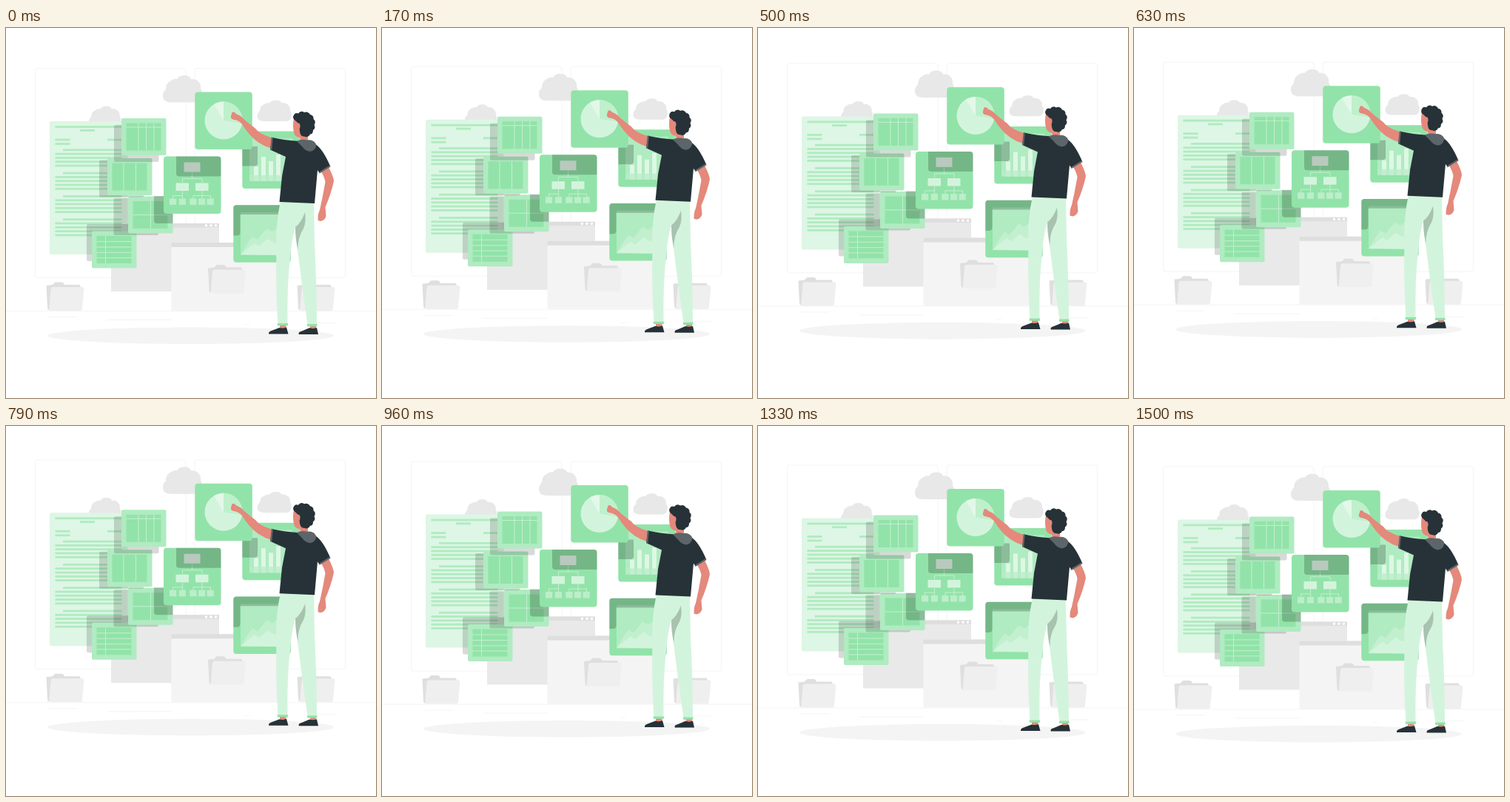
An HTML page that plays this animation: 500 by 500 pixels, repeating every 1540 ms.

```html
<!DOCTYPE html>
<html lang="en">
<head>
<meta charset="utf-8">
<title>Floating dashboard</title>
<style>
  html, body { margin: 0; height: 100%; overflow: hidden; background: #fff; }
  svg { display: block; width: 100%; height: 100%; }
  .green { fill: #92e3a9; }
  .soft { fill: #b0ebc1; }
  .pale { fill: #d3f4dc; }
  .dark { fill: #263238; }
  .grey { fill: #5c6569; }
  .skin { fill: #e4897b; }
  .shade { fill: #000; opacity: .2; }
  .line { fill: none; stroke: #c3f0cf; }
  .faint { fill: none; stroke: #f4f4f4; }
</style>
</head>
<body>
<svg viewBox="0 0 500 500">
  <defs>
    <path id="cloud" fill="#e8e8e8" d="M-17 36.500Q-27 36-27 28Q-27 22-23 19Q-23 10-16 7Q-12 4-8 5Q-5 0 2 0Q9 0 11 5Q19 4 23 11Q25 15 24 18Q27 22 26 28Q25 36.500 17 36.500Z"/>
    <g id="folder">
      <path fill="#dfdfdf" d="M54.500 348L63 347Q65 343.500 67 343.500H76Q78 344 79 347H99Q101 348 101 351L98 381H58Q56 381 56 378Z"/>
      <path fill="#efefef" d="M63 350H103Q105.500 350 105.300 353L103 379Q103 382 100 382H60Q58 382 58.300 379L60.500 353Q61 350 63 350Z"/>
    </g>
  </defs>
  <g id="scene">
    <g class="faint">
      <rect x="39.500" y="54.500" width="203.500" height="283" rx="3"/>
      <rect x="255" y="54.500" width="203.500" height="283" rx="3"/>
      <path d="M0 382.500H500M57 390.500H96M136 394.500H224M323 400.500H329M414 398.500H447"/>
    </g>
    <use href="#cloud" transform="translate(239 64)"/>
    <use href="#cloud" transform="translate(363 97.500) scale(.87 .78)"/>
    <use href="#cloud" transform="translate(134 105.500) scale(.82 .78)"/>
    <ellipse cx="249.500" cy="415.700" rx="193.500" ry="11.300" fill="#f4f4f4"/>

    <path fill="#e9e9e9" d="M142 264H288V356H142Z"/>
    <path fill="#dedede" d="M142 264H288V269.500H142Z"/>
    <path stroke="#fff" stroke-width="3.600" stroke-linecap="round" d="M270.500 266.800h0M277 266.800h0M283.500 266.800h0"/>
    <path fill="#f4f4f4" d="M223.500 290H369V382H223.500Z"/>
    <path fill="#dedede" d="M223.500 290H369V296H223.500Z"/>
    <use href="#folder"/>
    <use href="#folder" x="218.500" y="-23.500"/>
    <use href="#folder" x="339"/>

    <rect x="59" y="126" width="105.500" height="180" rx="2" fill="#def6e5"/>
    <g id="text" class="soft"></g>
    <g id="tables"></g>
    <path class="shade" d="M200 227H225.500V264H204Q200 264 200 260Z"/>

    <!-- bar chart -->
    <rect class="green" x="319.300" y="139.500" width="77.500" height="77.500" rx="4"/>
    <path class="soft" d="M329 149H387V207H329Z"/>
    <path fill="#def7e5" d="M335 187h6v20h-6zM345 174h6v33h-6zM355 180h6v27h-6zM365 171h6v36h-6z"/>
    <path fill="#b9edc8" opacity=".75" d="M329 199H387V207H329Z"/>
    <path class="shade" d="M319.300 160H340V182.500Q340 186.500 336 186.500H319.300Z"/>

    <!-- area chart -->
    <rect class="green" x="307.300" y="239.300" width="77.500" height="77.500" rx="4"/>
    <path class="soft" d="M317 249H375V307H317Z"/>
    <path fill="#c2f0cf" d="M317.500 306L325 293L333 282L340 286L352 271L360 275L375 264V307Z"/>
    <path fill="#d3f4dc" d="M317.500 306L328 297L336 291L342 295L354 285L361 290L375 292V307Z"/>
    <path class="shade" d="M311.300 239.300H381Q385 239.300 385 243.300V252H316.500V276Q316.500 280.500 312 280.500H307.300V243.300Q307.300 239.300 311.300 239.300Z"/>

    <!-- hierarchy -->
    <rect class="green" x="213" y="173.500" width="77.500" height="77.500" rx="4"/>
    <path class="line" d="M251.500 195V203.500M238.500 209V203.500H265V209M238.500 220V226.500M225.500 231V226.500H238.500V231M265 220V231M253 231V226.500H276.500V231"/>
    <path class="shade" d="M230 173.500H286.500Q290.500 173.500 290.500 177.500V200.500H234Q230 200.500 230 196.500Z"/>
    <path fill="#b9c9be" d="M240.500 181.500H262.500V194.500H240.500Z"/>
    <path class="pale" d="M229.500 209.500h17.500v10.500h-17.500zM256 209.500h17.500v10.500h-17.500z"/>
    <path fill="#bbeec9" d="M221 230.500h9.200v8.500h-9.200zM233.800 230.500h9.200v8.500h-9.200zM248.300 230.500h9.200v8.500h-9.200zM260 230.500h9.200v8.500h-9.200zM271.500 230.500h9.200v8.500h-9.200z"/>

    <!-- pie chart -->
    <rect class="green" x="255.300" y="86.500" width="77.500" height="77.500" rx="4"/>
    <circle class="pale" cx="294" cy="125" r="25.500"/>
    <path fill="#bff0cc" d="M294 125V99.500A25.500 25.500 0 0 1 319.200 129Z"/>
    <path fill="#e3f8e9" d="M294 125V99.500A25.500 25.500 0 0 0 281 103Z"/>

    <!-- man -->
    <path class="skin" d="M305.500 114Q308 112.500 311 116L317 119Q324 126 331 131Q337 135 341 140Q350 146 360 148.500L358 162.500Q349 160 341 154.500Q329 146 319 130Q315 125 309 124Q303 123.500 304 119Z"/>
    <path class="skin" d="M436 188Q443 202 443 207Q439 225 431.500 242L432.500 254Q431 260 425 261L421.500 260Q421.500 250 424 246Q428 228 431.500 208Q430 200 425 193Z"/>
    <path class="skin" d="M370 401H378.500V407H370ZM411 402H419V408H411Z"/>
    <path class="dark" d="M355 413.500Q354.500 410 359 409L369.500 405Q375 406.500 379 404.500L381.500 413.500ZM395.500 413.500Q395 410.500 400 409.500L410 405.300Q415 407 420 405L422 414H396Z"/>
    <path class="pale" d="M371 234Q364 264 365.500 300Q364 350 367.500 400H380.500Q379.500 350 384 310Q386 285 391 269Q391 285 394 300Q400 350 407.500 401H420Q420 350 417 290L416 236Z"/>
    <path fill="#a8c2b0" d="M404 249Q406 262 402 271Q394 283 394.500 300Q391 285 391 269Q399 263 404 249Z"/>
    <path class="green" d="M366.700 399H381V402.300H366.700ZM407 400H420.500V403.300H407Z"/>
    <path class="skin" d="M389 122Q387 132 389 141Q390 147 397 148L398 154H408V135L397 121Z"/>
    <path class="dark" d="M360 148Q377 152 397 153L418 157Q428 163 438.300 187L423.500 196L421 192L417 237L369.500 235L373 200L378 174L357 164.500Z"/>
    <path class="grey" d="M358.700 147.500L360.800 148L359.300 165L357 164.500ZM437.500 185.500L438.500 187.500L423.800 196.500L423 194.500Z"/>
    <path class="grey" d="M393 153Q399 149.500 407 151.500Q416 150 419.500 158Q418 166 411 167Q404 166 400 160Z"/>
    <path class="dark" d="M392 126Q386 122 389 117.500Q391 114 395 115.500Q398 111 403 114Q408 112 411 117Q416 118 415.500 123Q419.500 126 416.500 131Q419 135 415 138Q415 143.500 411 143.500Q408 149 403 146.500Q398 147 397 140L396 130Z"/>
    <ellipse class="skin" cx="395" cy="132.500" rx="2.500" ry="4"/>
  </g>
</svg>
<script>
const get = id => document.getElementById(id);
const rect = (x, y, w, h, attrs = '') => `<rect x="${x}" y="${y}" width="${w}" height="${h}" ${attrs}/>`;

function textLines() {
  const bar = (x, y, end = 156.5) => rect(x, y - 1.4, end - x, 2.8);
  let out = bar(66.5, 133.5) + bar(100, 138.3, 120) + bar(66.5, 151, 86.5) + bar(137, 151) + bar(66.5, 156.5, 86.5);
  for (let group = 0; group < 4; group++)
    for (let row = 0; row < 5; row++)
      out += bar(row ? 66.5 : 77, 164.8 + group * 31.3 + row * 5.3);
  return out;
}

// Columns and rows are offsets from the card corner.
function table(x, y, shadowX, shadowY, columns, rows) {
  const grid = columns.map(c => `M${x + c} ${y + 6.5}v37`).join('') + rows.map(r => `M${x + 6.5} ${y + r}h47`).join('');
  return rect(x + shadowX, y + shadowY, 60.5, 50, 'rx="2" fill="#000" opacity=".15"')
    + rect(x, y, 60.5, 50, 'rx="2" class="soft"')
    + rect(x + 6.5, y + 6.5, 47, 37, 'class="green"')
    + `<path class="line" d="${grid}"/>`;
}

get('text').innerHTML = textLines();
get('tables').innerHTML =
  table(116, 274.5, -7, -9.5, [18.5], [14, 21.5, 28.8, 36]) +
  table(165, 227.5, -19.5, 2.5, [30.5], [25]) +
  table(137, 176, -11, 2.5, [22, 38.5], []) +
  table(156, 122, -10, 9, [23, 33.5, 44], [12]);

// The whole scene rises and sinks 10 units at constant speed.
const LOOP = 1540, TOP_TIME = 725, HALF = 750, RANGE = 10;
function frame() {
  const t = performance.now() % LOOP;
  const drop = Math.min(1, Math.abs(t - TOP_TIME) / HALF) * RANGE;
  get('scene').setAttribute('transform', `translate(0 ${drop - 9.6})`);
  requestAnimationFrame(frame);
}
frame();
</script>
</body>
</html>
```
